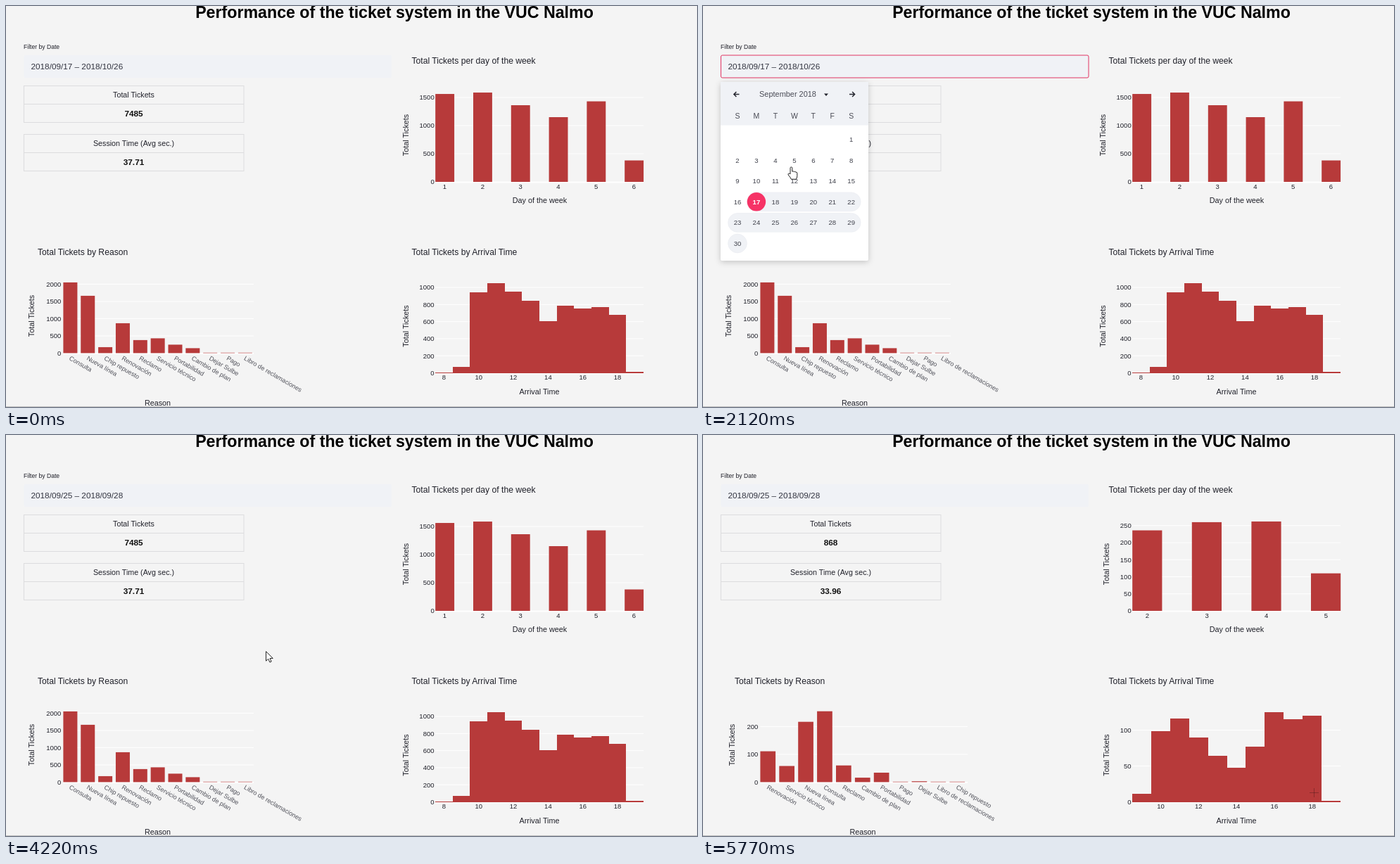
An HTML page that plays this animation: 982x570 px, repeating every 6.3 s.

```html
<!DOCTYPE html>
<html lang="en">
<head>
<meta charset="utf-8">
<title>Ticket dashboard</title>
<style>
html, body { margin: 0; width: 100%; height: 100%; overflow: hidden; background: #f4f4f4; }
svg { display: block; font-family: "Liberation Sans", Arial, sans-serif; fill: #20212a; }
.mid { text-anchor: middle; }
.end { text-anchor: end; }
.h1 { font-size: 23.2px; font-weight: 700; fill: #000; }
.h2 { font-size: 12.15px; }
.axis { font-size: 10.8px; }
.tick { font-size: 9.5px; }
.cat { font-size: 9px; fill: #50515a; }
.cell { font-size: 10.7px; }
.num { font-size: 11.8px; font-weight: 700; fill: #111; }
.small { font-size: 8.6px; }
.date { font-size: 11.75px; fill: #31333f; }
.day { font-size: 9.6px; fill: #40424c; }
.on { fill: #fff; font-weight: 700; }
.cal { filter: drop-shadow(0 2px 4px rgba(0, 0, 0, .2)); }
</style>
</head>
<body>
<svg id="stage" width="982" height="570" viewBox="0 0 982 570"></svg>
<script>
const LOOP = 6300;
const RED = '#b73a3a', PINK = '#f63366', PALE = '#f0f2f6';
const $ = id => document.getElementById(id);

const text = (x, y, s, cls, extra = '') =>
  `<text x="${x}" y="${y}" class="${cls}" ${extra}>${s}</text>`;
const rect = (x, y, w, h, fill, extra = '') =>
  `<rect x="${x}" y="${y}" width="${w}" height="${h}" fill="${fill}" ${extra}/>`;
const clamp = v => Math.max(0, Math.min(1, v));
const ramp = (t, a, b) => clamp((t - a) / (b - a));

// Bars, grid and axis labels of one chart
function chart(c) {
  let out = '';
  const low = c.base;
  for (let v = 0; v <= c.max; v += c.step) {
    const y = low - v * c.scale;
    out += rect(c.left, y - .5, c.right - c.left, v ? 1 : 2, '#fff');
    out += text(c.left - (c.cats ? 3 : 1.5), y + 3.3, v, 'tick end');
  }
  const crisp = c.joined ? 'shape-rendering="crispEdges"' : '';
  c.values.forEach((v, i) => {
    const h = Math.max(c.joined ? 1 : .6, v * c.scale);
    out += rect(c.left + i * c.pitch, low - h, c.bar, h, RED, crisp);
  });
  (c.cats || []).forEach((s, i) => {
    const x = c.left + c.bar / 2 + i * c.pitch - 2.3;
    out += text(0, 0, s, 'cat', `transform="translate(${x} 502.5) rotate(30)"`);
  });
  (c.ticks || []).forEach((s, i) =>
    out += text(c.tick0 + i * c.tickGap, c.tickY, s, 'tick mid'));
  out += text(0, 0, 'Total Tickets', 'axis mid',
    `transform="translate(${c.nameX} ${c.nameY}) rotate(-90)"`);
  return out + text(c.midX, c.midY, c.name, 'axis mid');
}

const week = { left: 610.2, right: 906, base: 250, tickY: 260, nameY: 183.5, midX: 758.5, midY: 280, name: 'Day of the week' };
const hour = { left: 610, right: 906, base: 521.5, tickY: 531, nameY: 455, midX: 758, midY: 551.5, name: 'Arrival Time', joined: true };
const reason = { left: 81.4, base: 493.4, nameY: 440.5, midY: 567.5, name: 'Reason' };
const hours = [10, 12, 14, 16, 18];

const views = {
  week: [
    { ...week, max: 1500, step: 500, scale: .08, pitch: 53.8, bar: 26.9, nameX: 571.5,
      values: [1562, 1587, 1362, 1150, 1431, 381], ticks: [1, 2, 3, 4, 5, 6], tick0: 623.5, tickGap: 53.8 },
    { ...week, max: 250, step: 50, scale: .485, pitch: 84.6, bar: 42.2, nameX: 576.5,
      values: [236, 260, 262, 110], ticks: [2, 3, 4, 5], tick0: 631.5, tickGap: 84.6 }
  ],
  reason: [
    { ...reason, right: 352, max: 2000, step: 500, scale: .049, pitch: 24.85, bar: 20, nameX: 40, midX: 215.5,
      values: [2051, 1663, 173, 867, 378, 429, 245, 143, 10, 8, 8],
      cats: ['Consulta', 'Nueva línea', 'Chip repuesto', 'Renovación', 'Reclamo', 'Servicio técnico',
        'Portabilidad', 'Cambio de plan', 'Dejar Sulbe', 'Pago', 'Libro de reclamaciones'] },
    { ...reason, right: 376, max: 200, step: 100, scale: .395, pitch: 26.9, bar: 21.7, nameX: 45, midX: 227,
      values: [111, 58, 217, 255, 60, 16, 34, 1, 3, 1, 1],
      cats: ['Renovación', 'Servicio técnico', 'Nueva línea', 'Consulta', 'Reclamo', 'Cambio de plan',
        'Portabilidad', 'Pago', 'Dejar Sulbe', 'Libro de reclamaciones', 'Chip repuesto'] }
  ],
  hour: [
    { ...hour, max: 1000, step: 200, scale: .1215, pitch: 24.65, bar: 24.65, nameX: 571.5,
      values: [6, 70, 941, 1048, 948, 842, 603, 788, 755, 768, 682, 10],
      ticks: [8, ...hours], tick0: 622.5, tickGap: 49.3 },
    { ...hour, max: 100, step: 50, scale: 1.02, pitch: 26.9, bar: 26.9, nameX: 576.5,
      values: [11.5, 98.5, 116, 90, 64.5, 48, 76.5, 125, 115, 120, 1],
      ticks: hours, tick0: 650.5, tickGap: 53.8 }
  ]
};

function table(y, label, id) {
  return rect(25.5, y, 312.5, 52, 'none', 'stroke="#dcdcde"') +
    `<path d="M25 ${y + 26}H338" stroke="#dcdcde"/>` +
    text(181.5, y + 16.8, label, 'cell mid') + text(181.5, y + 43, '', 'num mid', `id="${id}"`);
}

// Small chart toolbar in groups; the last item stands alone
function toolbar() {
  const groups = [1, 4, 4, 3];
  let x = 752, out = '';
  groups.forEach(n => {
    for (let i = 0; i < n; i++, x += 13.8)
      out += rect(x + 1, 328, 8, 8, 'none', 'stroke="#cbcbcb" stroke-width="1.6"');
    x += 7;
  });
  return out + rect(946, 327, 10, 10, '#c3c6cf');
}

const colX = c => 49 + c * 26.95;
const rowY = r => 189.5 + r * 29.6;
const place = d => [(d + 5) % 7, Math.floor((d + 5) / 7)];

// Month grid with a shaded span and solid dots on the chosen days
function days(from, to, dots, dark) {
  let out = '';
  for (let r = 0; r < 6; r++) {
    const a = Math.max(from, r * 7 - 5), b = Math.min(to, r * 7 + 1);
    if (a > b) continue;
    const x = colX(place(a)[0]) - 13.4;
    out += rect(x, rowY(r) - 13.4, colX(place(b)[0]) + 13.4 - x, 26.8, PALE, 'rx="13.4" stroke="#e9ebf0" stroke-width=".6"');
  }
  for (let d = 1; d <= 30; d++) {
    const [c, r] = place(d), x = colX(c), y = rowY(r), hit = dots.includes(d);
    if (hit) out += `<circle cx="${x}" cy="${y}" r="13.2" fill="${PINK}"/>`;
    out += text(x, y + 3.4, d, 'day mid' + (hit && d !== dark ? ' on' : ''));
  }
  return out;
}

function calendar() {
  const arrow = 'fill="none" stroke="#262730" stroke-width="1.5"';
  return rect(25, 108, 210, 254, '#fff', 'rx="2" class="cal"') + rect(25, 108, 210, 61.5, PALE) +
    `<path d="M51.5 125.5H44M47.4 122L43.9 125.5L47.4 129M208 125.5H215.5M212.1 122L215.6 125.5L212.1 129" ${arrow}/>` +
    text(120.5, 129, 'September 2018', 'mid', 'font-size="10.95" fill="#4a4c56"') +
    '<path d="M172 124.5H178L175 128Z"/>' +
    [...'SMTWTFS'].map((s, i) => text(colX(i), 160, s, 'mid', 'font-size="10.5" fill="#4a4c56"')).join('') +
    '<g id="days"></g>';
}

const pens = {
  arrow: '<path d="M.5 0V13.5L3.7 10.6L5.9 15.4L8.1 14.4L6 9.8H10.2Z" fill="#fff" stroke="#222"/>',
  beam: '<path d="M-3-6.3Q-.3-6.3 0-5.3Q.3-6.3 3-6.3M-3 6.7Q-.3 6.7 0 5.7Q.3 6.7 3 6.7M0-5.3V5.7" fill="none" stroke="#222" stroke-width="1.1"/>',
  hand: '<path d="M-1.4 9.5V1Q-1.4-.3 0-.3T1.4 1V6Q2.8 5 4 6.4Q5.4 5.6 6.6 7Q8.4 6.6 8.4 8.6V12.5Q8.2 15 7 17H0Q-1.5 14-4.4 10.6Q-4.8 8.6-3 8.8Z" fill="#fff" stroke="#222"/>',
  cross: '<path d="M-6 .5H7M.5-6V7" stroke="#000" stroke-opacity=".25"/>',
  none: ''
};

// Pointer route: time, x, y
const route = [
  [0, 820, 600], [70, 790, 560], [280, 680, 400], [470, 463, 163], [680, 203, 92], [890, 193.5, 88.5],
  [1560, 193.5, 88.5], [1780, 148, 150], [2460, 103, 308], [2700, 103, 308], [2850, 155.5, 307],
  [3260, 186, 307], [3880, 186, 307], [4410, 470.5, 308], [4950, 470.5, 308], [5230, 775, 425],
  [5560, 868, 508], [LOOP, 868, 508]
];

function pointer(t) {
  const i = route.findIndex(p => p[0] > t);
  const [t0, x0, y0] = route[i - 1], [t1, x1, y1] = route[i];
  const k = (t - t0) / (t1 - t0);
  return [x0 + (x1 - x0) * k, y0 + (y1 - y0) * k];
}

$('stage').innerHTML =
  text(552, 17, 'Performance of the ticket system in the VUC Nalmo', 'h1 mid') +
  text(25, 60.5, 'Filter by Date', 'small') +
  rect(25.5, 70, 522.5, 32, PALE, 'id="field" rx="2"') +
  text(35.5, 90, '', 'date', 'id="dates"') +
  rect(166.5, 79, 1, 14, '#222', 'id="caret"') +
  table(113.5, 'Total Tickets', 'total') + table(182.5, 'Session Time (Avg sec.)', 'avg') +
  text(576.5, 82.3, 'Total Tickets per day of the week', 'h2') +
  text(45, 353.8, 'Total Tickets by Reason', 'h2') +
  text(576.5, 353.8, 'Total Tickets by Arrival Time', 'h2') +
  '<g id="week"></g><g id="reason"></g><g id="hour"></g>' +
  `<g id="tools">${toolbar()}</g>` +
  rect(0, 569, 982, 1, '#bfbfbf') +
  `<g id="cal">${calendar()}</g><g id="pen"></g>`;

const shown = {};
function fill(id, key, make) {
  if (shown[id] === key) return;
  shown[id] = key;
  $(id).innerHTML = make();
}

const inside = (x, y, l, t, r, b) => x > l && x < r && y > t && y < b;

function draw(t) {
  const fresh = t >= 4480 ? 1 : 0;
  const late = { week: fresh, reason: fresh, hour: t >= 4950 ? 1 : 0 };
  for (const id in late) fill(id, late[id], () => chart(views[id][late[id]]));
  $('total').textContent = fresh ? '868' : '7485';
  $('avg').textContent = fresh ? '33.96' : '37.71';
  $('dates').textContent = t < 2920 ? '2018/09/17 – 2018/10/26'
    : t < 3820 ? '2018/09/25 –' : '2018/09/25 – 2018/09/28';

  const focus = t < 1180 ? 0 : 1 - ramp(t, 2660, 2900);
  $('field').setAttribute('stroke', `rgba(224,52,98,${focus})`);
  $('caret').style.opacity = t >= 1180 && t < 2660 && (t + 760) % 1000 < 500 ? 1 : 0;

  const open = ramp(t, 1180, 1400) * (1 - ramp(t, 3890, 4100));
  $('cal').style.opacity = open;
  const [x, y] = pointer(t);
  const hover = x > 170 ? 28 : 27;
  if (t < 2660) fill('days', 'start', () => days(17, 30, [17]));
  else if (t < 2920) fill('days', 'pick', () => days(17, 30, [17, 25], 25));
  else if (t < 3820) fill('days', hover, () => days(25, hover, [25]));
  else fill('days', 'done', () => days(25, 28, [25, 28]));

  const kind = t < 70 ? 'none'
    : inside(x, y, 25, 70, 548, 102) ? 'beam'
    : open > .9 && inside(x, y, 25, 170, 235, 362) ? 'hand'
    : inside(x, y, 610, 385, 906, 521) ? 'cross' : 'arrow';
  fill('pen', kind, () => pens[kind]);
  $('pen').setAttribute('transform', `translate(${x} ${y})`);

  $('tools').style.opacity = t < 2000
    ? ramp(t, 70, 200) * (1 - ramp(t, 330, 640))
    : ramp(t, 5000, 5160) * (1 - ramp(t, 5480, 5770));
}

const begin = performance.now();
function frame() {
  draw((performance.now() - begin) % LOOP);
  requestAnimationFrame(frame);
}
frame();
</script>
</body>
</html>
```
